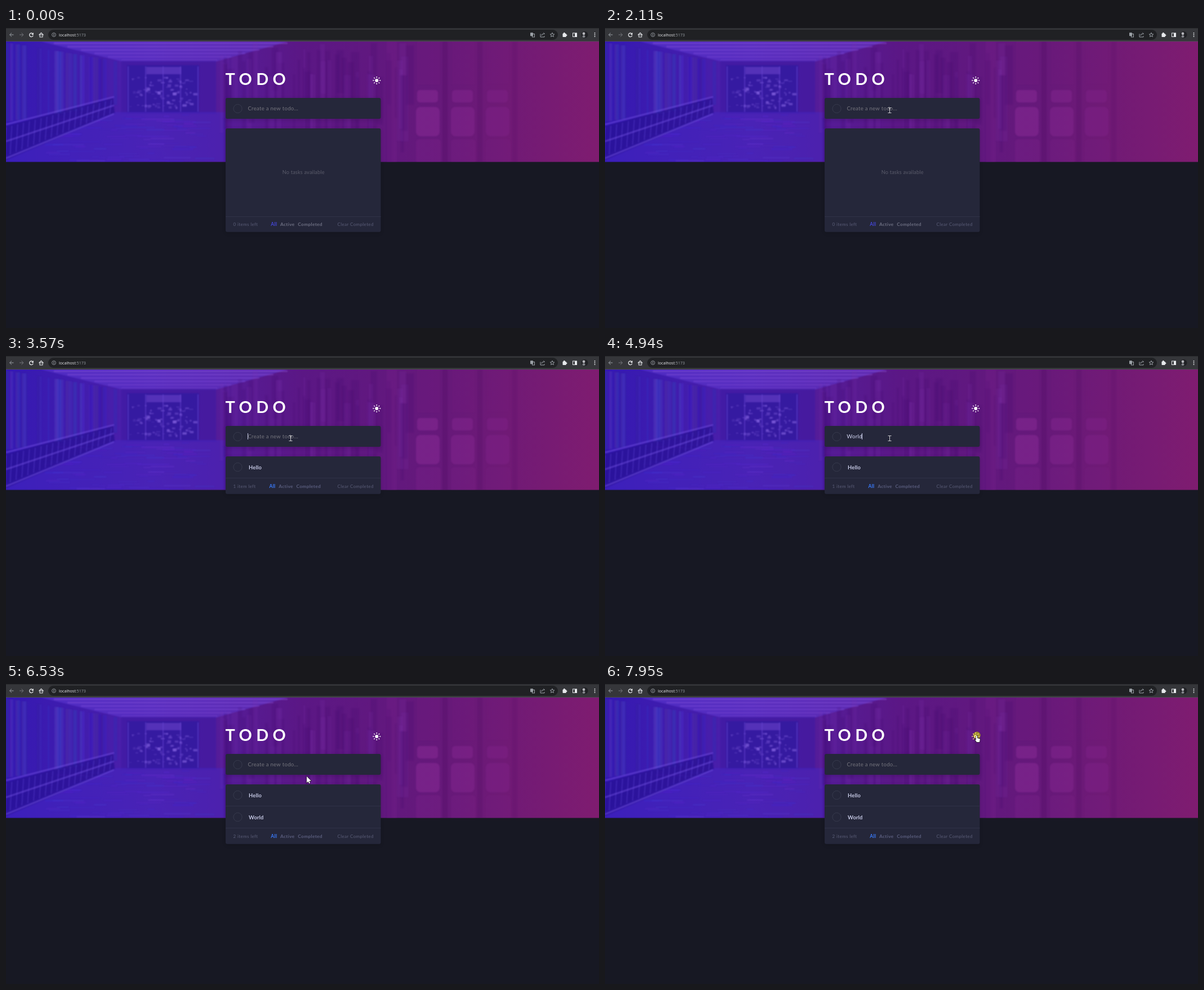
Animation of 1053x532 px, one loop 8000 ms. Source, as an HTML page with a canvas:

```html
<!DOCTYPE html>
<html lang="en">
<head>
<meta charset="utf-8">
<title>Todo</title>
<style>
html, body { margin: 0; width: 100%; height: 100%; overflow: hidden; background: #171823; }
canvas { display: block; }
</style>
</head>
<body>
<canvas id="stage" width="1053" height="532"></canvas>
<script>
const W = 1053, H = 532, LOOP = 8000;
const LEFT = 390, WIDTH = 275.5, ROW = 39;
const INK = '#c8cbe7', RULE = '#303247', PALE = '#e8eaed', GREY = '#9aa0a6';
const stage = document.getElementById('stage').getContext('2d');
const backdrop = document.createElement('canvas');
backdrop.width = W;
backdrop.height = H;
let c = backdrop.getContext('2d');

function rect(x, y, w, h, fill) {
  c.fillStyle = fill;
  c.fillRect(x, y, w, h);
}
function round(x, y, w, h, r, fill) {
  c.beginPath();
  c.roundRect(x, y, w, h, r);
  c.fillStyle = fill;
  c.fill();
}
function frame(x, y, w, h, stroke) {
  c.strokeStyle = stroke;
  c.lineWidth = 1;
  c.strokeRect(x, y, w, h);
}
function line(stroke, width, ...points) {
  c.beginPath();
  for (let i = 0; i < points.length; i += 2) c.lineTo(points[i], points[i + 1]);
  c.strokeStyle = stroke;
  c.lineWidth = width;
  c.stroke();
}
function poly(fill, ...points) {
  c.beginPath();
  for (let i = 0; i < points.length; i += 2) c.lineTo(points[i], points[i + 1]);
  c.fillStyle = fill;
  c.fill();
}
function disc(x, y, r, fill) {
  c.beginPath();
  c.arc(x, y, r, 0, Math.PI * 2);
  c.fillStyle = fill;
  c.fill();
}
function ring(x, y, r, stroke, width = 1, from = 0, to = Math.PI * 2) {
  c.beginPath();
  c.arc(x, y, r, from, to);
  c.strokeStyle = stroke;
  c.lineWidth = width;
  c.stroke();
}
function text(str, x, y, size, fill, { weight = 400, gap = 0.3, family = 'Lato' } = {}) {
  c.font = `${weight} ${size}px ${family}, sans-serif`;
  c.letterSpacing = gap + 'px';
  c.fillStyle = fill;
  c.fillText(str, x, y);
  return c.measureText(str).width;
}
function random(seed) {
  return () => (seed = (seed * 16807) % 2147483647) / 2147483647;
}
const mix = (a, b, k) => a + (b - a) * k;

// Tinted hall: ceiling, columns, doorway, floor and railing, shelves on the right
function drawHero() {
  const rnd = random(77);
  const span = (from, to) => mix(from, to, rnd());
  c.save();
  c.beginPath();
  c.rect(0, 24, W, 213.4);
  c.clip();
  const tint = c.createLinearGradient(0, 0, W, 0);
  ['#3419b3', '#4f20a8', '#5b1785', '#671979', '#7f1c70']
    .forEach((color, i) => tint.addColorStop(i / 4, color));
  rect(0, 24, W, 215, tint);
  c.filter = 'blur(1px)';

  poly('rgba(98,60,214,.5)', 62, 24, 500, 24, 372, 60, 208, 60);
  for (let i = 0; i < 6; i++) {
    const y = 27 + i * 6;
    line(`rgba(150,95,228,${0.4 - i * 0.04})`, 2.4, 85 + i * 24, y, 500 - i * 25, y);
  }
  for (let i = 0; i < 36; i++) {
    const k = rnd(), x = k * 200, top = 26 + k * 34;
    rect(x, top, span(2, 9), 140 - k * 65, `rgba(${span(40, 95)},${span(20, 80)},${span(150, 220)},.3)`);
  }

  rect(205, 58, 168, 94, 'rgba(62,26,162,.6)');
  rect(215, 66, 128, 84, 'rgba(48,26,160,.7)');
  rect(249, 69, 62, 13, 'rgba(105,65,200,.6)');
  for (let i = 0; i < 90; i++) {
    rect(span(218, 334), span(86, 140), span(2, 8), span(1, 5), `rgba(140,105,230,${span(0.15, 0.6)})`);
  }
  for (let i = 0; i < 5; i++) rect(216 + i * 31, 68, 2, 81, 'rgba(100,65,205,.6)');

  poly('rgba(68,38,196,.5)', 194, 149, 390, 149, 390, 237, 0, 237, 0, 225);
  for (let i = 0; i < 90; i++) {
    rect(span(60, 340), span(153, 236), span(10, 60), span(1, 2.5),
      `rgba(${span(45, 140)},${span(30, 85)},220,${span(0.1, 0.32)})`);
  }
  poly('rgba(38,16,145,.65)', 0, 174, 190, 124, 193, 151, 0, 234);
  for (let i = 0; i < 19; i++) {
    const x = i * 10.4;
    line('rgba(94,67,214,.5)', 1.5, x, 176 - i * 2.7, x - 3, 228 - i * 4.2);
  }
  for (let i = 0; i < 3; i++) {
    line('rgba(110,78,222,.6)', 2.5, 0, 171 + i * 30, 192, 122 + i * 15);
  }

  for (let i = 0; i < 60; i++) {
    const x = span(372, 710), light = rnd() < 0.5;
    rect(x, span(24, 90), span(3, 15), span(50, 213), light ? 'rgba(126,52,172,.16)' : 'rgba(66,10,108,.16)');
  }
  rect(676, 24, 18, 215, 'rgba(119,34,140,.3)');
  for (let i = 0; i < 3; i++) {
    const x = 730 + i * 62, a = 0.4 - i * 0.1, shade = `rgba(148,48,158,${a})`;
    rect(x, 24, 40, 76, `rgba(128,32,132,${a * 0.3})`);
    round(x, 110, 37, 22, 5, shade);
    round(x - 2, 140, 42, 52, 8, shade);
    round(x - 2, 197, 44, 44, 6, `rgba(141,43,149,${a * 0.5})`);
    rect(x + 45, 24, 9, 215, `rgba(75,12,96,${a * 0.6})`);
  }
  c.restore();
}

function drawNavArrow(x, dir, color) {
  line(color, 1, x - 3.5 * dir, 12, x + 3.5 * dir, 12);
  line(color, 1, x, 8.7, x + 3.4 * dir, 12, x, 15.3);
}
function drawStar(x, y) {
  const points = [];
  for (let i = 0; i <= 10; i++) {
    const r = i % 2 ? 1.8 : 4, a = i * Math.PI / 5 - Math.PI / 2;
    points.push(x + r * Math.cos(a), y + r * Math.sin(a));
  }
  line(GREY, 1, ...points);
}
function drawBrowser() {
  rect(0, 0, W, 24, '#35363a');
  rect(0, 0, W, 1, '#28292c');
  rect(0, 23, W, 1, '#494a4e');
  round(75, 3, 905, 18, 9, '#202124');
  drawNavArrow(10, -1, GREY);
  drawNavArrow(27.5, 1, '#74777c');
  ring(45, 12.3, 3.3, PALE, 1.3, 0.3, 5.5);
  poly(PALE, 48.8, 8, 48.8, 12, 45, 12);
  line(PALE, 1.2, 58.5, 12.5, 62.5, 8.6, 66.5, 12.5);
  frame(60, 12, 5, 4, PALE);
  ring(85, 12, 3.4, GREY, 0.9);
  rect(84.5, 10, 1, 4, GREY);
  const url = { gap: 0, family: '"Open Sans"' };
  const w = text('localhost', 94, 14.8, 7.1, PALE, { ...url, weight: 500 });
  text(':5173', 94 + w, 14.8, 7.1, GREY, url);

  round(931, 8.3, 5, 6, 0.7, GREY);
  frame(934.5, 10.5, 4, 5.5, GREY);
  line(GREY, 1, 949, 10.5, 949, 16, 956, 16, 956, 14);
  line(GREY, 1, 951.3, 13.5, 952, 11, 956.5, 10.3, 954.3, 8.3);
  drawStar(970, 12.3);
  round(988.5, 9.7, 6.2, 6.3, 0.8, PALE);
  disc(991.3, 9.3, 1.4, PALE);
  disc(995, 12.8, 1.4, PALE);
  frame(1006.5, 9, 7, 6.5, PALE);
  rect(1010, 9, 3.5, 6.5, PALE);
  disc(1027.5, 12, 6, '#202125');
  disc(1026, 10, 2.4, '#b4b5ba');
  round(1023.5, 13, 5, 4, 2, '#83858b');
  for (let i = -1; i <= 1; i++) disc(1045.5, 12 + i * 3, 0.9, PALE);
}

function drawCard(y, h) {
  c.save();
  c.shadowColor = 'rgba(0,0,0,.15)';
  c.shadowBlur = 6;
  c.shadowOffsetY = 2;
  round(LEFT, y, WIDTH, h, 3, '#25273a');
  c.restore();
}
const drawCheck = y => ring(411.5, y, 7.6, '#373a4d');

rect(0, 0, W, H, '#171823');
drawHero();
drawBrowser();
text('TODO', 389.5, 101, 28.8, '#fff', { weight: 700, gap: 7.4 });
drawCard(124, 37);
drawCheck(143);

const CLICK = 1580, BLINK = 515;
const entries = [
  { word: 'Hello', keys: [2180, 2380, 2980, 3120, 3310], sent: 3570 },
  { word: 'World', keys: [4160, 4550, 4680, 4810, 4940], sent: 5470 }
];

// Blinking restarts with each key press
function caretOn(t) {
  const last = [CLICK, ...entries.flatMap(e => e.keys)].findLast(k => k <= t);
  return last !== undefined && Math.floor((t - last) / BLINK) % 2 === 0;
}

function drawInput(t) {
  const entry = entries.find(e => t < e.sent);
  const typed = entry ? entry.word.slice(0, entry.keys.filter(k => k <= t).length) : '';
  let w = 0;
  if (typed) w = text(typed, 429.3, 145.5, 9.5, INK, { weight: 500 });
  else text('Create a new todo...', 429.5, 145.5, 9.5, '#74747d');
  if (caretOn(t)) rect(429 + Math.round(w), 137, 1, 11, INK);
}

function drawList(t) {
  const items = entries.filter(e => t >= e.sent);
  const n = items.length, plural = n === 1 ? '' : 's';
  const foot = n ? 178 + n * ROW : 334;
  drawCard(178, foot - 150.3);
  items.forEach(({ word }, i) => {
    const y = 197 + i * ROW;
    drawCheck(y);
    text(word, 431, y + 3.5, 9.3, INK, { weight: 700, gap: 0.2 });
    rect(LEFT, y + 19, WIDTH, 1, RULE);
  });
  if (!n) {
    rect(LEFT, foot, WIDTH, 1, RULE);
    text('No tasks available', 490.8, 258.7, 9.1, '#5b5c6b', { gap: 0.2 });
  }
  const y = foot + 16.5, x = plural ? 470.3 : 467.5;
  const side = { gap: 0.36 }, bold = { weight: 700 };
  const muted = n ? '#5b5e7e' : '#6d6f82';
  text(`${n} item${plural} left`, 403.5, y, 8, '#5b5e78', side);
  text('All', x, y, 8.5, n ? '#3a7cfd' : '#4548dc', bold);
  text('Active', x + 16.7, y, 8.4, muted, bold);
  text('Completed', x + 48, y, 8.4, muted, bold);
  text('Clear Completed', 588.5, y, 8, '#5b5e78', side);
}

function drawSun(hover, glow) {
  const color = hover ? '#f4e77c' : '#fff';
  if (glow) disc(660.3, 91, 6.5, '#9a852c');
  disc(658.3, 93, 3, color);
  for (let i = 0; i < 8; i++) {
    const a = i * Math.PI / 4, x = Math.cos(a), y = Math.sin(a);
    line(color, 1.4, 658.3 + x * 4.8, 93 + y * 4.8, 658.3 + x * 7, 93 + y * 7);
  }
}

// Stops of the pointer; dx, dy bow the way that leads there
const stops = [
  { t: 70, x: 1008, y: 521 },
  { t: 700, x: 465, y: 146 },
  { t: 840, x: 501, y: 148 },
  { t: 1250, x: 505, y: 146 },
  { t: 6460, x: 505, y: 146 },
  { t: 7000, x: 577, y: 141, dx: 95, dy: 64 },
  { t: 7620, x: 660, y: 92, dx: 18, dy: 3 }
];
function pointerAt(t) {
  t = Math.floor(t / 70) * 70;
  const i = stops.findIndex(s => s.t > t);
  if (i < 0) return stops.at(-1);
  const a = stops[i - 1], b = stops[i];
  const k = (t - a.t) / (b.t - a.t);
  const ease = k * k * (3 - 2 * k), bow = Math.sin(Math.PI * k);
  return {
    x: mix(a.x, b.x, ease) + (b.dx ?? 0) * bow,
    y: mix(a.y, b.y, ease) + (b.dy ?? 0) * bow
  };
}

function drawIBeam() {
  const color = '#c9c9cc';
  line(color, 1, 0.5, -4, 0.5, 4);
  for (const y of [-4.5, 4.5]) line(color, 1, -2.5, y, 3.5, y);
}
function outlined(shape) {
  line('#222', 1.4, ...shape);
  poly('#fff', ...shape);
}
function drawArrow() {
  outlined([0, 0, 0, 11, 2.6, 8.7, 4.4, 12.4, 6, 11.6, 4.4, 8.1, 7.8, 7.8, 0, 0]);
}
function drawHand() {
  outlined([-1, 0, 1, 0, 1, 4, 6, 5.5, 5, 11, 0, 11, -3, 6.5, -1, 7, -1, 0]);
}
function drawPointer({ x, y }, overSun) {
  const overInput = x > LEFT && x < LEFT + WIDTH && y > 124 && y < 161;
  c.save();
  c.translate(Math.round(x), Math.round(y));
  (overSun ? drawHand : overInput ? drawIBeam : drawArrow)();
  c.restore();
}

function draw(t) {
  c = stage;
  c.drawImage(backdrop, 0, 0);
  drawInput(t);
  drawList(t);
  const visible = t >= stops[0].t;
  const pointer = visible ? pointerAt(t) : stops[0];
  const overSun = Math.hypot(pointer.x - 658, pointer.y - 93) < 9;
  drawSun(overSun, t >= 7950);
  if (visible) drawPointer(pointer, overSun);
}

const start = performance.now();
function tick() {
  draw((performance.now() - start) % LOOP);
  requestAnimationFrame(tick);
}
tick();
</script>
</body>
</html>
```
